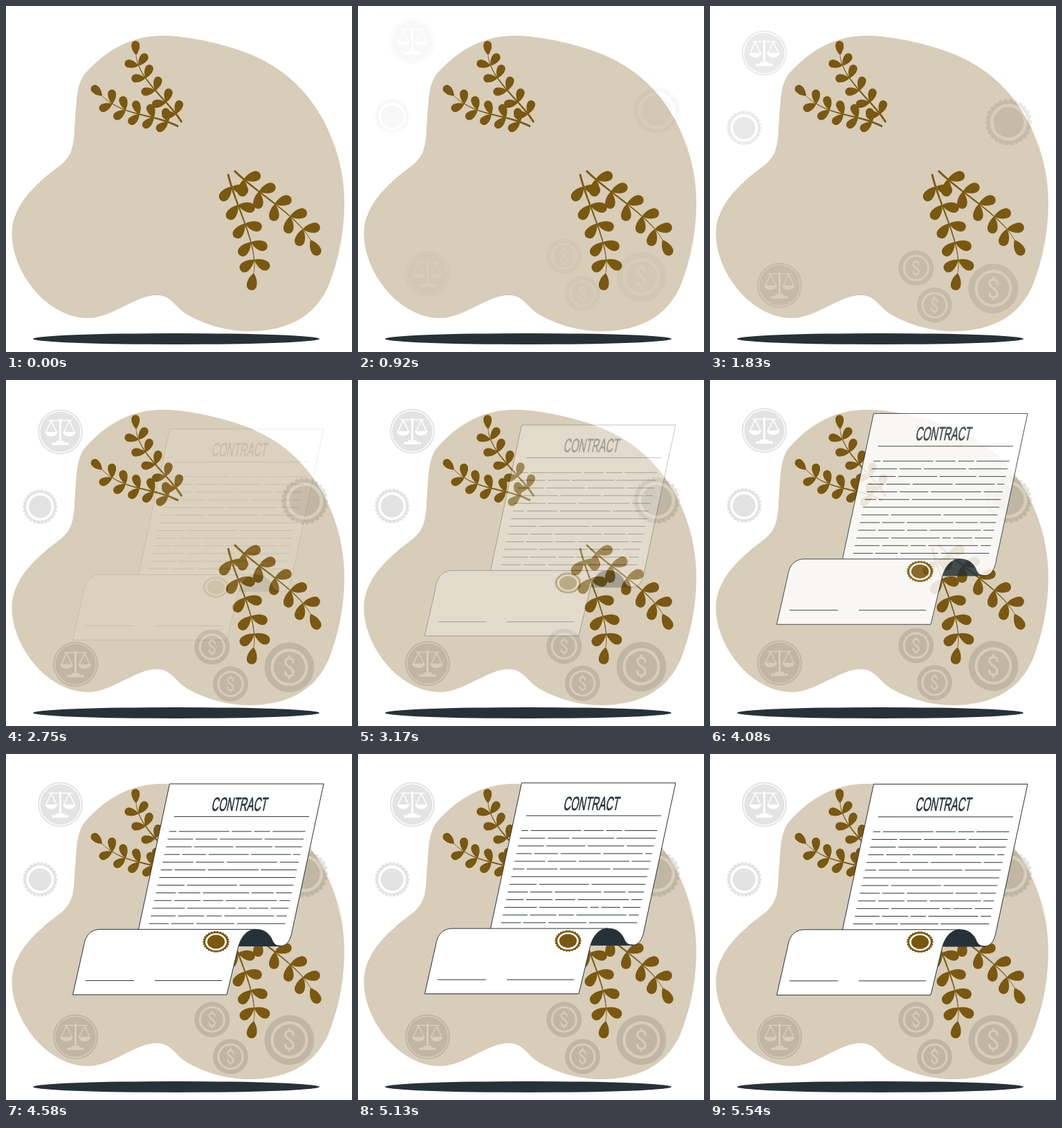
An HTML page that plays this animation: 500x500 px, repeating every 5580 ms.

```html
<!DOCTYPE html>
<html lang="en">
<head>
<meta charset="utf-8">
<title>Contract</title>
<style>
html, body { margin: 0; width: 100%; height: 100%; overflow: hidden; background: #fff; }
svg { display: block; width: 100%; height: 100%; }
</style>
</head>
<body>
<svg viewBox="0 0 500 500">
  <defs>
    <path id="leaf" d="M0 0C.18-.17.45-.3.7-.29C.9-.28 1-.14 1 0C1 .14.9.28.7.29C.45.3.18.17 0 0Z"/>
    <mask id="seal">
      <circle r="23" fill="#fff"/>
      <circle r="22.8" fill="none" stroke="#fff" stroke-width="4.8" stroke-linecap="round" pathLength="26" stroke-dasharray="0 1"/>
      <circle r="18.2" fill="none" stroke="#000" stroke-width="3.6"/>
    </mask>
    <mask id="coin">
      <circle r="25.5" fill="#fff"/>
      <g fill="none" stroke="#000">
        <circle r="17.6" stroke-width="3"/>
        <path stroke-width="2.2" d="M4-4V-5.5Q4-9 0-9T-4-5.5Q-4-3 0-.2T4 5.3Q4 9 0 9T-4 5.3V4M0-9V-12M0 9V12"/>
      </g>
    </mask>
    <mask id="scales">
      <circle r="32.5" fill="#fff"/>
      <circle r="29.8" fill="none" stroke="#000" stroke-width="1.3"/>
      <path fill="none" stroke="#000" stroke-width="1.5" d="M-17-16.5H17M-13-16L-21 1M-13-16L-5 1M13-16L5 1M13-16L21 1"/>
      <path d="M-1.5-19H1.5V13H6V15.5H12V19H-12V15.5H-6V13H-1.5ZM-22.5 0H-3.5Q-6 6.5-13 6.5T-22.5 0ZM22.5 0H3.5Q6 6.5 13 6.5T22.5 0Z"/>
    </mask>
  </defs>

  <path fill="#d7cdb8" d="M225 43C182 43 145 63 115 97C101 112 102 140 99 178C98 202 95 216 80 229C48 253 8.5 285 8.5 329C8.5 385 60 451 118 451C155 451 185 418 218 418C240 418 244 436 262 446C290 462 322 470 352 470C412 470 450 444 467 402C481 366 489 325 489 285C489 218 462 160 430 124C402 92 366 72 325 60C288 49 255 43 225 43Z"/>
  <g id="plants" fill="#7a5810" stroke="#7a5810"></g>
  <g id="icons"></g>
  <ellipse cx="246" cy="481" rx="207" ry="8" fill="#263238"/>

  <g id="contract" fill="#fff" stroke="#263238">
    <path d="M236.5 43.7H459L412.5 261C410 270 406 278 397 278H340L191.5 254Z"/>
    <path fill="#263238" d="M336 278C341 262 350 254 361 254C375 254 381 262 384 268C387 276 391 278 397 278Z"/>
    <path d="M361 254H137C125 254 116 260 113 275L96.5 348.5H319L336 278C341 262 350 254 361 254Z"/>
    <path id="lines" fill="none"/>
    <text transform="matrix(.525 0 -.2 1 336.3 82.5)" text-anchor="middle" font-family="'Liberation Sans', Arial, sans-serif" font-size="27.5" fill="#263238" stroke-width=".7">CONTRACT</text>
    <circle r="26" mask="url(#seal)" transform="translate(303.5 272) scale(.77 .62)" fill="#7a5810" stroke="none"/>
  </g>
</svg>
<script>
const LOOP = 5580, RISE = 3340, DELAY = 2225;
const $ = id => document.getElementById(id);

const bezier = (a, b, c, d, s) =>
  a * (1 - s) ** 3 + 3 * b * s * (1 - s) ** 2 + 3 * c * s * s * (1 - s) + d * s ** 3;

function leaf([x, y], angle, size) {
  const deg = angle * 180 / Math.PI;
  return `<use href="#leaf" stroke="none" transform="translate(${x} ${y}) rotate(${deg}) scale(${size})"/>`;
}

// A tapering stem along a cubic curve, with five pairs of leaves and one at the tip.
function branch(size, a, b, c, d) {
  const at = s => [0, 1].map(k => bezier(a[k], b[k], c[k], d[k], s));
  const heading = s => {
    const [x0, y0] = at(s - .02), [x1, y1] = at(s + .02);
    return Math.atan2(y1 - y0, x1 - x0);
  };
  let out = leaf(d, heading(1), size);
  for (let s = 0; s < 1; s += .05) {
    out += `<path d="M${at(s)}L${at(s + .05)}" stroke-width="${3 - 2.3 * s}"/>`;
  }
  for (let i = 0; i < 5; i++) {
    const s = .13 + .18 * i;
    for (const side of [-1, 1]) out += leaf(at(s), heading(s) + side * .98, size);
  }
  return out;
}

$('plants').innerHTML =
  branch(20.5, [249, 174], [212, 155], [170, 160], [139, 130]) +
  branch(20.5, [254, 168], [236, 138], [190, 105], [188, 71]) +
  branch(25, [321, 243], [331, 288], [365, 345], [358, 386]) +
  branch(25, [330, 238], [362, 270], [421, 303], [440, 338]);

const icon = (kind, x, y, s = 1) =>
  `<circle r="34" opacity=".105" mask="url(#${kind})" transform="translate(${x} ${y}) scale(${s})"/>`;

$('icons').innerHTML =
  icon('scales', 78.5, 73) + icon('scales', 100.5, 408.7) +
  icon('seal', 49.3, 181.3) + icon('seal', 431.5, 173, 1.34) +
  icon('coin', 297.8, 383.7) + icon('coin', 324.5, 437.3) + icon('coin', 409.5, 413.2, 1.41);

// Rows of dashes of random length, following the slant of the sheet.
let seed = 7;
const random = () => (seed = seed * 16807 % 2147483647) / 2147483647;

let lines = 'M243 91H438M115 328H185M215 328H312';
for (let row = 0; row < 13; row++) {
  const y = 112.5 + row * 11.1, left = 236 - row * 2.43, right = left + 196.5;
  lines += `M${left} ${y}`;
  for (let x = left + 12 + 50 * random(); row !== 6 && x < right - 8; x += 12 + 70 * random()) {
    lines += `H${x - 1.8}M${x + 1.8} ${y}`;
  }
  lines += `H${right}`;
}
$('lines').setAttribute('d', lines);

// Cubic easing that overshoots before it settles.
function ease(x) {
  if (x <= 0) return 0;
  if (x >= 1) return 1;
  let lo = 0, hi = 1;
  for (let i = 0; i < 24; i++) {
    const mid = (lo + hi) / 2;
    if (bezier(0, .36, .5, 1, mid) < x) lo = mid; else hi = mid;
  }
  return bezier(0, -.01, 1.38, 1, lo);
}

function slide(node, p, from) {
  node.setAttribute('transform', `translate(0 ${from * (1 - p)})`);
  node.setAttribute('opacity', Math.max(0, Math.min(1, p)));
}

const start = performance.now();
function draw() {
  const t = (performance.now() - start) % LOOP;
  slide($('icons'), ease(t / RISE), -30);
  slide($('contract'), ease((t - DELAY) / RISE), 30);
  requestAnimationFrame(draw);
}
draw();
</script>
</body>
</html>
```
